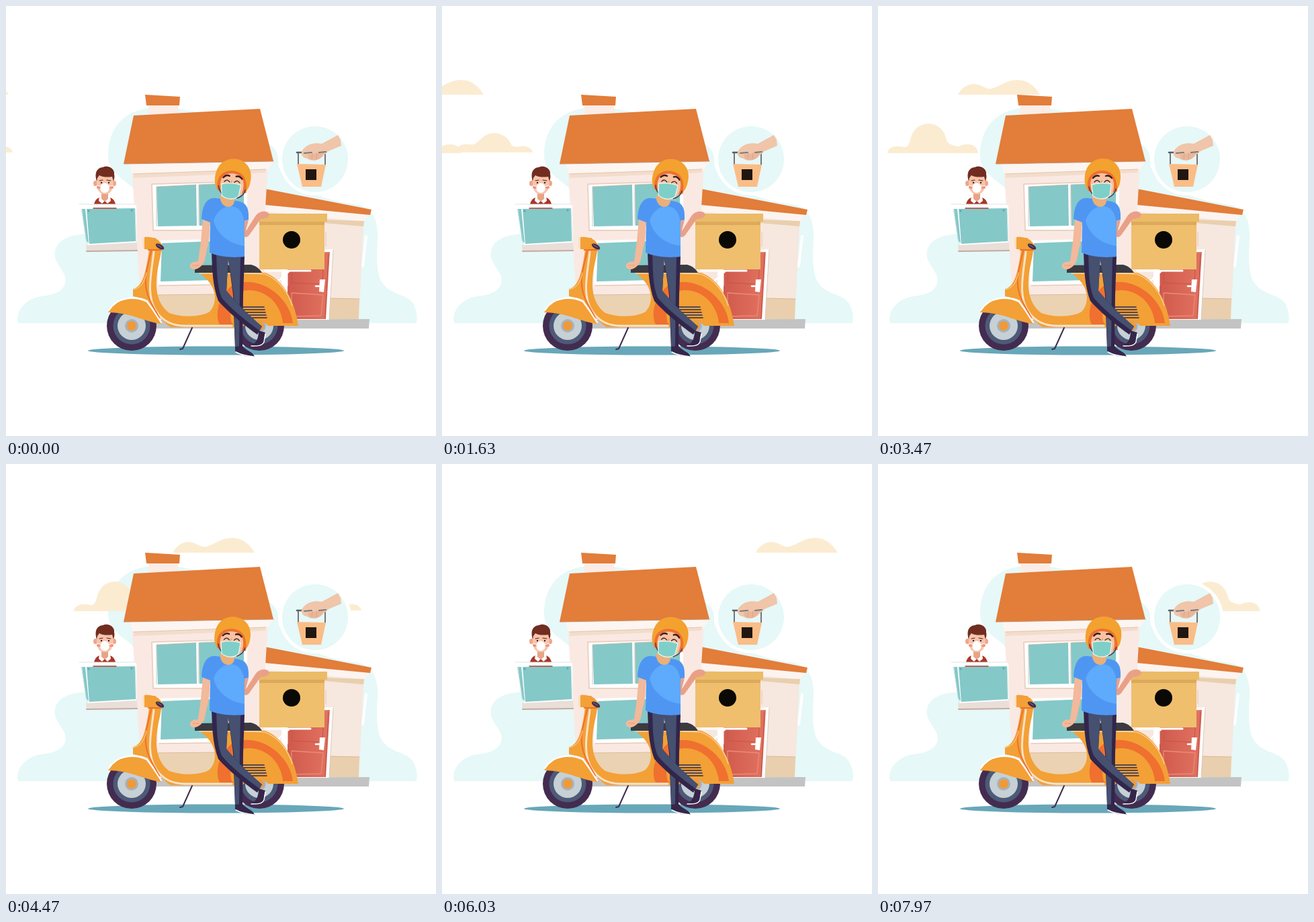
Write an HTML page with a canvas that moves like this. It is 640x640 px and loops after 8000 ms.

```html
<!DOCTYPE html>
<html lang="en">
<head>
<meta charset="utf-8">
<title>Home delivery</title>
<style>
html, body { margin: 0; height: 100%; overflow: hidden; background: #fff; }
canvas { display: block; width: 100vw; height: 100vh; }
</style>
</head>
<body>
<canvas id="stage"></canvas>
<script>
const LOOP = 8000, SIZE = 640;
const canvas = document.getElementById('stage');
const ctx = canvas.getContext('2d');
const scale = window.devicePixelRatio || 1;
canvas.width = canvas.height = SIZE * scale;

const ORANGE = '#f3a036', RED = '#ef702f', ROOF = '#e27d3a', TEAL = '#85c8c8',
  PALE = '#e6f8f8', CREAM = '#fbecd1', PLUM = '#432c50', SLATE = '#465070',
  WALL = '#fae9e3', SAND = '#ebd2b2', SKIN = '#f2b99a';

function fill(path, color) {
  ctx.fillStyle = color;
  ctx.fill(new Path2D(path));
}

function line(path, color, width = 1) {
  ctx.strokeStyle = color;
  ctx.lineWidth = width;
  ctx.lineCap = ctx.lineJoin = 'round';
  ctx.stroke(new Path2D(path));
}

function oval(x, y, rx, ry, color, turn = 0) {
  ctx.fillStyle = color;
  ctx.beginPath();
  ctx.ellipse(x, y, rx, ry, turn, 0, Math.PI * 2);
  ctx.fill();
}

const disc = (x, y, r, color) => oval(x, y, r, r, color);

// Smooth curve through [time, value] points
function track(points, t) {
  let i = 0;
  while (i < points.length - 2 && t > points[i + 1][0]) i++;
  const slope = k => {
    const a = points[Math.max(k - 1, 0)], b = points[Math.min(k + 1, points.length - 1)];
    return (b[1] - a[1]) / (b[0] - a[0]);
  };
  const [t0, v0] = points[i], [t1, v1] = points[i + 1];
  const d = t1 - t0, s = (t - t0) / d, q = 1 - s;
  return v0 * (1 + 2 * s) * q * q + slope(i) * d * s * q * q
    + v1 * s * s * (3 - 2 * s) - slope(i + 1) * d * s * s * q;
}

const clouds = [
  { y: 110, shape: 'M0 22C5 12 14 6 24 6C36 7 42 15 50 13C62 10 72 0 88 0C104 0 114 9 122 22Z',
    path: [[0, -118], [830, -103], [1630, -60], [3470, 119], [4470, 248], [5370, 372], [6770, 574], [8000, 752]] },
  { y: 175, shape: 'M0 44C1 34 14 32 24 35C32 36 33 28 35 20C40 6 50 0 61 0C74 0 84 9 87 21C88 30 96 33 106 34C118 28 134 30 135 44Z',
    path: [[0, -147], [1630, -107], [3470, 14], [4470, 101], [5070, 154], [6770, 323], [8000, 436]] },
  { y: 189, shape: 'M0 29C1 18 12 15 22 17C34 20 38 0 58 0C72 0 80 10 84 19C92 23 97 18 104 20C111 21 114 25 115 29Z',
    path: [[0, -105], [1630, 20], [4470, 414], [5030, 505], [5370, 558], [8000, 980]] }
];

const nod = [[0, .62], [900, .93], [1630, 1], [2570, .62], [3470, 0], [4470, .5],
  [5370, .95], [5900, .98], [6770, .82], [7570, .45], [8000, .2]];

function drawSky(t) {
  fill('M18 472C14 452 30 436 52 432C80 430 92 418 88 402C82 388 70 380 73 364C78 346 96 340 125 339L197 335 197 280C180 257 152 252 152 222C152 185 172 157 213 152C290 146 330 180 370 197C395 205 406 212 405 232C404 262 470 290 520 295C545 298 554 318 553 345C551 380 552 400 560 412C573 431 597 428 606 443C611 452 613 462 611 472Z', PALE);
  for (const c of clouds) {
    ctx.save();
    ctx.translate(track(c.path, t), c.y);
    fill(c.shape, CREAM);
    ctx.restore();
  }
}

function drawAnnex() {
  fill('M222 467L541 466 540 480 222 480Z', '#c3c3c3');
  fill('M385 290L533 310 525 466 385 466Z', '#f6e7df');
  fill('M385 295L540 310 534 321 385 306Z', '#fcf4f0');
  fill('M385 272L544 303 542 311 385 296Z', ROOF);
  fill('M474 318L533 320 532 328 474 323Z', '#e9cfae');
  line('M536 343L531 387', '#fff', 4);
  fill('M482 435L526 436 525 466 481 466Z', '#e9cfad');
  line('M482 435L526 436', '#d9b991');
  line('M476 337L476 357', '#f0d6c6', 2);
  fill('M410 366L487 362 481 467 410 467Z', '#fff');
  line('M487 363L481 466', '#dcc9bf');
  const door = ctx.createLinearGradient(420, 0, 480, 0);
  door.addColorStop(0, '#cf5a4d');
  door.addColorStop(1, '#e27260');
  fill('M419 369L482 366 476 466 419 466Z', door);
  line('M426 378L473 375 471 414 426 412Z', '#c75448');
  line('M425 427L472 430 469 461 425 462Z', '#ea8b77', 1.3);
  line('M480 369L475 465', '#b85347');
  fill('M467 407L475 407 473 426 466 425Z', '#fff');
  line('M461 417L467 417', '#fff', 2.5);
}

function drawHouse() {
  fill('M212 147L256 147 256 163 212 163Z', '#fbece6');
  fill('M207 132L259 135 258 148 209 148Z', ROOF);
  fill('M187 238L390 235 386 300 400 466 202 466Z', WALL);
  fill('M184 236L398 232 388 245 188 249Z', '#fdf5f1');
  fill('M190 250L387 243 386 248 190 256Z', '#f2ddcc');
  line('M190 250L387 243', '#e5c5ac');
  fill('M190 163L378 153 398 231 175 235Z', ROOF);
  line('M176 235L398 231', '#cf8d66');

  fill('M217 265L359 260 359 334 219 334Z', '#fff');
  line('M358 261L217 265 219 334 300 334', '#ead3c2', 2);
  fill('M224 269L283 266 284 327 226 328Z', TEAL);
  fill('M287 266L354 263 354 324 288 327Z', TEAL);
  line('M224 328L224 269 283 266M287 326L287 266 354 263', '#c7b6ab', .8);
  fill('M225 349L312 347 315 416 226 416Z', '#fff');
  fill('M232 353L308 350 308 408 230 410Z', TEAL);
  line('M228 416L310 415', '#e5cbb7', 1.5);
  fill('M222 430L330 429 330 466 222 466Z', SAND);
  line('M222 430L330 429', '#dabf98');
}

function drawNeighbour() {
  fill('M130 302C131 288 136 284 147 284C158 284 163 288 164 302Z', '#a93629');
  fill('M139 283L155 283 156 290 151 294 147 290 143 294 138 290Z', '#fff');
  fill('M142 278L152 278 152 287 147 291 142 287Z', '#e8a487');
  oval(133, 264, 3, 4, '#eda58b');
  oval(161, 264, 3, 4, '#eda58b');
  fill('M135 257C134 273 138 280 147 280C157 280 160 273 160 256L154 250 140 251Z', '#f8c4ab');
  fill('M135 261C131 247 136 241 144 240C153 236 162 243 161 250C162 254 161 258 160 261L158 254C152 255 144 255 139 252L136 256Z', '#702d20');
  line('M139 260L144 259M150 259L156 260', '#52251d', 1.1);
  disc(142, 263, 1.2, '#34211d');
  disc(153, 263, 1.2, '#34211d');
  oval(138, 270, 3, 2, '#f0937f');
  oval(157, 270, 3, 2, '#f0937f');
  line('M136 267L142 269M153 269L159 267', '#fff', 1);
  fill('M141 268C143 262 151 262 153 268C155 276 150 278 147 278C143 278 139 275 141 268Z', '#fff');

  fill('M111 299L194 297 195 352 121 358Z', '#fff');
  fill('M113 302L118 302 123 353 119 349Z', TEAL);
  fill('M120 302L192 301 193 350 124 354Z', TEAL);
  line('M112 302L121 356M192 302L194 351', '#c3dddd', .8);
  fill('M119 356L195 352 196 365 120 366Z', '#eaded8');
  line('M120 365L195 364', '#c2ada2', 2);
  fill('M109 295L193 295 192 300 109 300Z', '#fff');
  line('M109 295L192 295', '#d5dede', .8);
  line('M130 301L164 301', '#a93629', 1.3);
  disc(123, 305, 1.5, '#5ca3ac');
  disc(187, 304, 1.5, '#5ca3ac');
}

function drawTakeaway() {
  disc(460, 228, 54, '#fff');
  disc(460, 228, 49, PALE);
  line('M435 235L435 218M475 236L475 218', '#737579', 2);
  fill('M433 235L476 236 469 269 441 269Z', '#fabd87');
  ctx.fillStyle = '#211711';
  ctx.fillRect(446, 243, 16, 16);
  line('M433 218L476 218', '#5b5d62', 2.5);
  fill('M494 192L470 205C456 202 445 207 440 217C439 222 442 226 448 227C455 232 466 231 472 223L480 216 499 208 498 199Z', '#f0c5a9');
  fill('M449 221L474 218 468 226C461 231 453 229 450 226Z', '#e9b69b');
  line('M444 219L455 218M466 218L476 217', '#777a7c', 2);
  line('M456 219L455 228M463 218L462 228', '#d79d82', .7);
}

function wheel(x, y) {
  disc(x, y, 37, PLUM);
  disc(x, y, 27.5, '#4d5a78');
  disc(x, y, 21, '#c6d0d5');
  disc(x, y, 10, '#a7b2bf');
  disc(x, y, 7, '#f09a37');
}

function drawScooter() {
  oval(312.5, 513, 190.5, 6.5, '#68a7b9');
  wheel(187, 476);
  wheel(377, 476);
  line('M277 479L263 510 259 511', '#3f2b4d', 2);

  line('M386 394L453 394M421 395L398 416M418 395L418 416', '#fff', 3);
  fill('M206 345L222 345 236 360 231 365C230 370 230 372 229 376C220 414 222 441 243 457C262 464 290 463 303 455C317 440 313 414 288 398L345 395 386 397C414 408 430 440 435 476L390 476C382 466 362 466 352 478L245 478C226 466 214 438 205 436L189 432 189 421C205 418 209 390 213 363L206 361Z', ORANGE);
  line('M220 366C216 400 208 432 224 455C235 471 250 476 266 476L336 476', '#fae2c6', 3);
  line('M358 398L385 399C409 408 421 430 426 446', '#fbd6a0', 1.2);
  fill('M318 474C309 455 320 425 340 414C378 400 423 433 427 472L412 472C408 437 381 419 350 425C335 432 330 452 338 474Z', RED);
  fill('M336 472C330 449 338 428 353 424C383 418 408 442 412 470L385 469C372 463 358 466 350 472Z', ORANGE);
  for (let i = 0; i < 5; i++) {
    const y = 448 + i * 4;
    line(`M${350 + i} ${y}L${384 + i} ${y}`, '#55484f', 1.8);
  }
  line('M216 365C211 390 203 404 211 430C216 444 222 452 228 464', RED, 2);
  line('M189 422C201 420 207 410 209 397', '#fbd6a0', 1);

  fill('M203 344L207 345 207 361 203 361Z', '#fae0c0');
  fill('M206 344C218 343 232 347 234 362L206 362Z', ORANGE);
  line('M212 363L230 363', RED, 2);
  oval(229, 358, 7, 3.3, PLUM, .55);
  line('M225 355L231 359', '#5c6580', 1.5);

  fill('M152 456C162 434 192 432 209 441L222 458 232 473C211 472 186 456 152 456Z', ORANGE);
  line('M153 453C166 432 194 431 210 439L231 471', '#fff', 2.2);
  fill('M281 386L365 385C373 387 378 392 381 397L281 397Z', '#3b3a40');
  line('M288 398L380 398', '#faeadb', 1.2);
}

function drawBox() {
  ctx.fillStyle = '#efbf6e';
  ctx.fillRect(377, 320, 97, 72);
  ctx.fillStyle = '#dda95a';
  ctx.fillRect(377, 321, 97, 5);
  ctx.fillStyle = '#ebbb67';
  ctx.fillRect(376, 309, 102, 12);
  disc(425, 348, 13, '#0b0906');
}

function drawBody() {
  fill('M330 370L355 373 353 430 352 509 341 509 338 430Z', '#32254b');
  fill('M330 373L349 374 348 420 347 508 341 508 339 430Z', SLATE);
  fill('M341 507L352 506C357 513 367 514 370 522L356 521 341 514Z', '#36264a');
  line('M342 515C351 520 360 521 369 522', '#fff', 1.5);
  fill('M306 366L331 371 328 424C346 446 366 464 381 477L374 489C354 475 330 455 316 439C307 415 307 390 306 366Z', '#32254b');
  fill('M313 369L331 372 328 424C346 446 366 464 381 477L377 483C354 466 332 448 321 434C313 415 314 390 313 369Z', SLATE);
  fill('M376 483L386 486 383 500C380 507 371 506 365 505C374 501 376 492 376 483Z', '#36264a');
  line('M386 488L384 500C381 507 371 506 365 506', '#fff', 1.4);

  fill('M293 318L304 320 302 350 295 381C290 389 284 394 276 391C272 388 273 383 279 381L286 380 290 350Z', SKIN);
  line('M278 386L287 386', '#d99878', .8);
  fill('M351 322L361 318 357 335 371 313C377 304 389 304 392 310C392 315 386 317 379 317L362 341C357 347 351 343 351 335Z', '#e9a087');
  fill('M313 286C300 284 292 295 291 317L304 322 303 367C318 374 340 375 355 373L355 320 361 318C362 300 358 291 341 290Z', '#4f96f3');
  fill('M309 319C316 300 331 296 340 299C350 301 355 315 355 325L355 357C337 355 314 343 309 319Z', '#5eaafc');
  fill('M319 282L339 282 340 291C338 302 322 302 319 288Z', '#e9b079');
}

function drawHead(t) {
  ctx.save();
  ctx.translate(332, 296);
  ctx.rotate(track(nod, t) * 8 * Math.PI / 180);
  ctx.translate(-332, -296);
  fill('M314 276C307 268 307 259 308 252C310 236 321 227 335 227C350 227 361 238 361 253C361 263 359 271 353 276Z', '#f3a12f');
  fill('M313 275C308 254 320 245 334 245C350 246 356 256 356 276L350 277 316 276Z', RED);
  fill('M317 270C314 256 322 249 334 249C348 250 352 259 351 270C350 281 343 288 333 288C323 287 318 279 317 270Z', '#f8c3a1');
  line('M320 256Q324 251 329 253M339 253Q344 251 348 256', '#2f1d22', 2.4);
  line('M322 262Q326 257 330 262M337 262Q341 257 345 262', '#332128', 1.3);
  line('M333 260L332 264', '#e58f79', 1.2);
  line('M314 269C315 276 319 280 323 283M354 272C353 280 348 283 343 285', '#49364b', 1.4);
  const mask = 'M318 266C327 263 339 263 347 265L345 282C337 289 327 288 320 283Z';
  fill(mask, '#7fcfc9');
  line(mask, '#eefafa', 1.1);
  ctx.restore();
}

function draw(t) {
  ctx.setTransform(scale, 0, 0, scale, 0, 0);
  ctx.fillStyle = '#fff';
  ctx.fillRect(0, 0, SIZE, SIZE);
  drawSky(t);
  drawAnnex();
  drawHouse();
  drawNeighbour();
  drawTakeaway();
  drawScooter();
  drawBox();
  drawBody();
  drawHead(t);
}

const start = performance.now();
function tick() {
  draw((performance.now() - start) % LOOP);
  requestAnimationFrame(tick);
}
tick();
</script>
</body>
</html>
```
